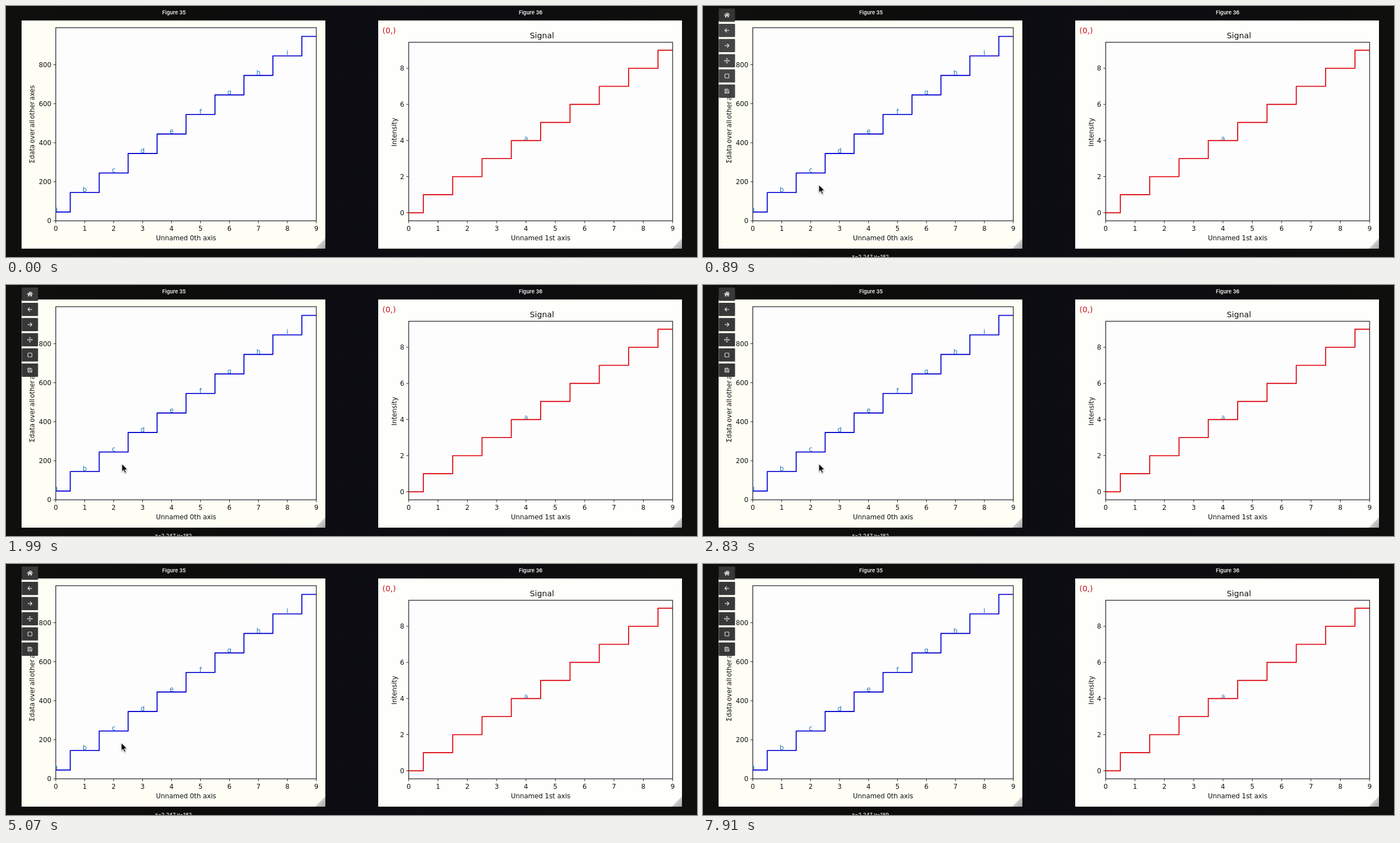
These frames come from a looping animation (1242 by 451 pixels, 8000 ms). An HTML page:

```html
<!DOCTYPE html>
<html lang="en">
<head>
<meta charset="utf-8">
<style>
  html, body { margin: 0; width: 1242px; height: 451px; overflow: hidden; background: #0d0d0f; }
  svg { display: block; }
  text { font: 11.85px "DejaVu Sans", sans-serif; fill: #111; }
  .mid { text-anchor: middle; }
  .end { text-anchor: end; }
  .title { font-size: 14.2px; }
  .index { font-size: 14px; fill: #c8141c; }
  .tag { fill: #1f77b4; }
  .ui { font: 600 9.3px Inter, sans-serif; fill: #f4f4f4; }
  .coords { font: 500 9.4px Inter, sans-serif; fill: #eee; animation: 8s step-end infinite; }
  .sigma { word-spacing: -1.95px; }
  .axes { fill: #fdfdfe; stroke: #161620; stroke-width: 1.2; }
  .tick { stroke: #222; stroke-width: 1; }
  .step { fill: none; stroke-width: 1.9; stroke-linejoin: round; }
  .icon { fill: none; stroke: #e2e2e2; stroke-width: 1.3; }
  #bar { animation: bar 8s linear infinite; }
  #cursor { animation: cursor 8s linear infinite, seen 8s step-end infinite; }
  #c0 { animation-name: c0; }
  #c1 { animation-name: c1; }
  #c2 { animation-name: c2; }

  @keyframes bar {
    0%, 3.75% { opacity: 0; }
    6.125%, 7.3% { opacity: .4; }
    10.5%, 16.4% { opacity: .93; }
    18.5%, 100% { opacity: 1; }
  }
  @keyframes cursor {
    0%, 2.4% { transform: translate(300px, 452px); animation-timing-function: cubic-bezier(.2, .6, .4, 1); }
    6%, 8% { transform: translate(208.8px, 321.6px); }
    10%, 50% { transform: translate(208.2px, 321.2px); }
    55%, 65% { transform: translate(207.2px, 321.2px); }
    72%, 100% { transform: translate(208.2px, 319.8px); }
  }
  @keyframes seen { 0% { opacity: 0; } 2.4% { opacity: 1; } 90% { opacity: 0; } }
  @keyframes c0 { 0% { opacity: 0; } 5.3% { opacity: 1; } 7.4% { opacity: 0; } }
  @keyframes c1 { 0% { opacity: 0; } 7.4% { opacity: 1; } 72% { opacity: 0; } }
  @keyframes c2 { 0% { opacity: 0; } 72% { opacity: 1; } }
</style>
</head>
<body>
<svg width="1242" height="451" viewBox="0 0 1242 451">
  <defs>
    <linearGradient id="back">
      <stop offset="0" stop-color="#0f0f0d"/>
      <stop offset=".25" stop-color="#0d0d09"/>
      <stop offset=".5" stop-color="#0c0c13"/>
      <stop offset=".75" stop-color="#0d0d0f"/>
      <stop offset="1" stop-color="#0f0f0d"/>
    </linearGradient>
    <linearGradient id="grip" x1="0" y1="0" x2="1" y2="1">
      <stop offset=".45" stop-color="#d4d4d4"/>
      <stop offset="1" stop-color="#a4a4a8"/>
    </linearGradient>
    <filter id="soft" x="-50%" y="-50%" width="200%" height="200%">
      <feDropShadow dx="0" dy="1.2" stdDeviation="1.2" flood-opacity=".35"/>
    </filter>
  </defs>
  <rect width="1242" height="451" fill="url(#back)"/>
  <g id="plots"></g>
  <text class="index" x="676.5" y="49">(0,)</text>
  <text class="mid title" x="963.3" y="58">Signal</text>
  <text class="mid coords" id="c0" x="301" y="453.6">x=2.706 y=152</text>
  <text class="mid coords" id="c1" x="301" y="453.6">x=2.247 y=182</text>
  <text class="mid coords" id="c2" x="301" y="453.6">x=2.247 y=189</text>
  <g id="bar"></g>
  <g id="cursor">
    <path d="M0 0V14.4L3.3 11.3L5.6 16.8L8 15.8L5.7 10.4H10.2Z" fill="#000" stroke="#fff"
      stroke-width="1" stroke-linejoin="round" filter="url(#soft)"/>
  </g>
</svg>
<script>
  const text = (x, y, str, cls = "mid", extra = "") =>
    `<text class="${cls}" x="${x}" y="${y}" ${extra}>${str}</text>`;
  const line = (x1, y1, x2, y2) =>
    `<line class="tick" x1="${x1}" y1="${y1}" x2="${x2}" y2="${y2}"/>`;

  function plot(p) {
    const { left, top, right, panel } = p, bottom = 386;
    const X = v => left + v * (right - left) / 9;
    const Y = v => p.zero - v * p.unit;
    const edge = panel + 546;
    let out = `<rect x="${panel}" y="26" width="546" height="410" fill="${p.paper}"/>
      <path d="M${edge} 417.5V436H${edge - 18.5}Z" fill="url(#grip)"/>
      <rect class="axes" x="${left}" y="${top}" width="${right - left}" height="${bottom - top}"/>
      <clipPath id="clip${panel}"><rect x="${left}" y="${top}" width="${right - left}" height="${bottom - top}"/></clipPath>`;

    let path = `M${X(0)} ${Y(p.value(0))}`;
    for (let i = 0; i < 10; i++) {
      out += line(X(i), bottom, X(i), bottom + 4.2) + text(X(i), 404, i);
      if (i) path += `H${X(i - .5)}V${Y(p.value(i))}`;
    }
    path += `H${X(9)}`;
    for (let i = 0; i < 5; i++) {
      const v = i * p.tick;
      out += line(left - 4.2, Y(v), left, Y(v)) + text(left - 8, Y(v) + 4.4, v, "end");
    }

    let tags = "";
    p.tags.forEach(([i, letter]) => {
      const y = Y(p.value(i));
      tags += `<svg x="0" y="0" width="1242" height="${y}">${text(X(i), y + p.drop, letter, "mid tag")}</svg>`;
    });
    out += `<g clip-path="url(#clip${panel})">${tags}
      <path class="step" d="${path}" stroke="${p.color}"/></g>`;

    const mid = (top + bottom) / 2;
    out += text((left + right) / 2, 420.5, p.xLabel);
    out += text(0, 0, p.yLabel, "mid " + p.labelClass,
      `transform="translate(${p.labelX} ${mid + p.labelShift}) rotate(-90)"`);
    return out + text(panel + 274, 15.3, p.name, "mid ui");
  }

  document.getElementById("plots").innerHTML = plot({
    panel: 28, left: 89.5, right: 557.7, top: 39, zero: 386, unit: .3507, tick: 200,
    value: i => 45 + 100 * i, tags: [..."abcdefghi"].map((c, i) => [i, c]), drop: -1.2,
    color: "#0a0ad2", paper: "#fefef5", name: "Figure 35",
    xLabel: "Unnamed 0th axis", yLabel: "Σdata over all other axes",
    labelClass: "sigma", labelX: 51, labelShift: 0
  }) + plot({
    panel: 669, left: 723.8, right: 1198.2, top: 65.2, zero: 371.5, unit: 32.45, tick: 2,
    value: i => i, tags: [[4, "a"]], drop: .4,
    color: "#e01018", paper: "#fefefa", name: "Figure 36",
    xLabel: "Unnamed 1st axis", yLabel: "Intensity",
    labelClass: "", labelX: 702, labelShift: 1.2
  });

  const arrow = "M4 0H-3.5M-.3-3.4L-3.7 0L-.3 3.4";
  const icons = [
    `<path d="M-5 .3L0-4L5 .3M3-4V-2"/><path d="M-3.4 .6L0-2.4L3.4 .6V4H1V1.4H-1V4H-3.4Z" fill="#e2e2e2" stroke="none"/>`,
    `<path d="${arrow}"/>`,
    `<path d="${arrow}" transform="scale(-1 1)"/>`,
    `<path d="M-4 0H4M0-4V4M-1.6-3L0-4.6L1.6-3M-1.6 3L0 4.6L1.6 3M-3-1.6L-4.6 0L-3 1.6M3-1.6L4.6 0L3 1.6" stroke-width="1"/>`,
    `<rect x="-3.6" y="-3.5" width="7.2" height="7" rx="1" stroke-width="1.1"/>`,
    `<path d="M-3.6-3.6H2L3.6-2V3.6H-3.6ZM-2-3.4V-1.2H1.4V-3.4M-2 3.4V.9H2V3.4" stroke-width="1"/>`
  ];
  document.getElementById("bar").innerHTML = icons.map((icon, i) => {
    const y = 4.6 + i * 27.3;
    return `<rect x="28.3" y="${y}" width="29.3" height="23.8" rx="1.2" fill="#383838"/>
      <g class="icon" transform="translate(43 ${y + 11.9})">${icon}</g>`;
  }).join("");
</script>
</body>
</html>
```
